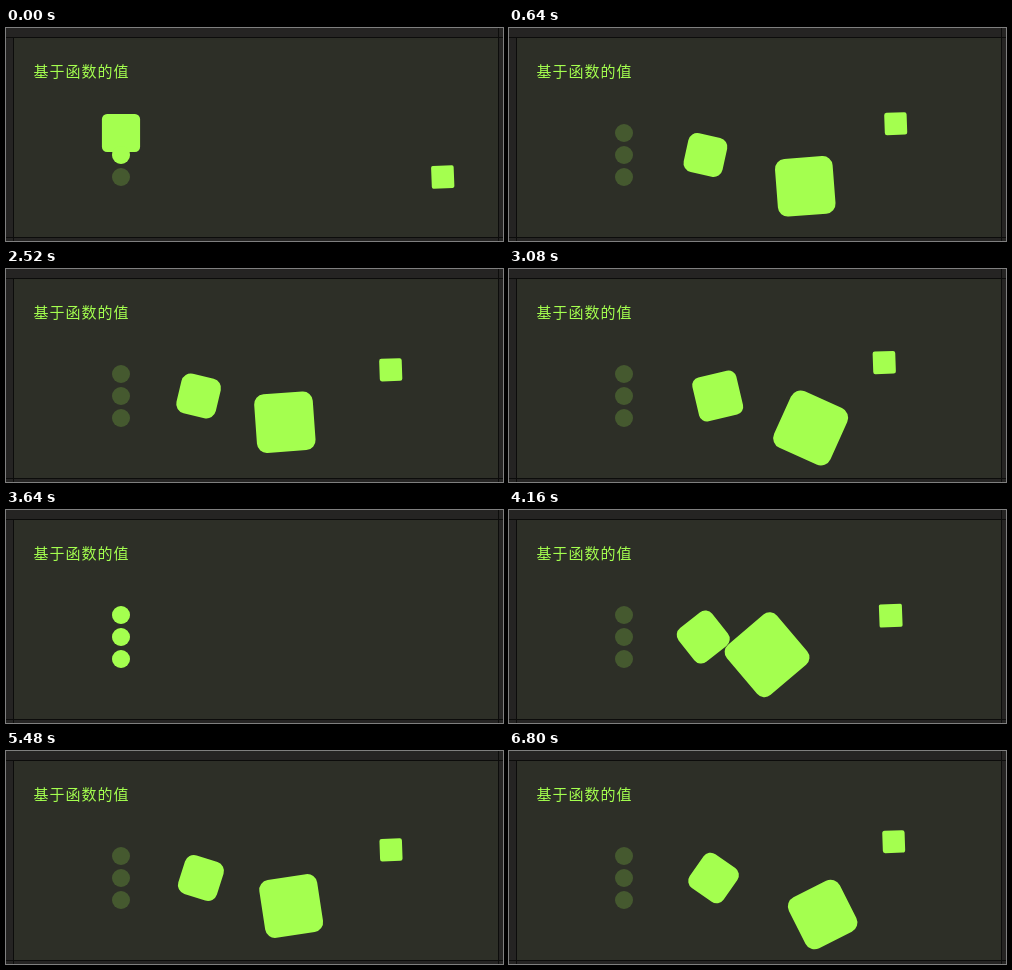
Write an HTML page that moves like this. It is 497x213 px and loops after 6880 ms.

```html
<!DOCTYPE html>
<html lang="zh-CN">
<head>
<meta charset="utf-8">
<title>基于函数的值</title>
<style>
  html, body { margin: 0; width: 100%; height: 100%; overflow: hidden; background: #252423; }
  svg { display: block; width: 497px; height: 213px; }
  .panel { fill: #2d2f27; }
  .line { fill: #0c0c0b; }
  .lime { fill: #a4ff4f; }
  .ghost { opacity: .2; }
  text { font: 400 15px "Noto Sans CJK SC", "Noto Sans CJK", sans-serif; letter-spacing: 1px; }
</style>
</head>
<body>
<svg viewBox="0 0 497 213">
  <rect class="panel" x="8" y="10" width="484" height="199"/>
  <g class="line">
    <rect x="0" y="9" width="497" height="1"/>
    <rect x="0" y="209" width="497" height="1"/>
    <rect x="7" y="9" width="1" height="204"/>
    <rect x="492" y="0" width="1" height="213"/>
  </g>
  <text class="lime" x="27.5" y="48.5">基于函数的值</text>
  <g class="lime ghost">
    <circle cx="115" cy="105" r="9"/>
    <circle cx="115" cy="127" r="9"/>
    <circle cx="115" cy="149" r="9"/>
  </g>
  <g id="shapes" class="lime"></g>
</svg>
<script>
  const LOOP = 6880, STEP = 40;
  const SWING = 1957, LEAD = 252;   // one-way run, and how far into it the loop begins
  const SIZE = 18;

  // Each property: [from, to, delay, duration]
  const items = [
    { y0: 105, x: [0, 170, 322, 1770], y: [0, 50, 338, 1720], scale: [1, 3.25, 177, 1300],
      rotate: [0, -279, 255, 1610], radius: [.5, .17, 35, 1450] },
    { y0: 127, x: [0, 80, 291, 1680], y: [0, 0, 300, 1500], scale: [1, 2.25, 290, 1400],
      rotate: [0, 288, 256, 1590], radius: [.5, .23, 254, 1690] },
    { y0: 149, x: [0, 270, 26, 1212], y: [0, -50, 312, 1800], scale: [1, 1.25, 60, 1500],
      rotate: [0, -2, 40, 1400], radius: [.5, .1, 60, 1400] }
  ];

  const group = document.getElementById('shapes');
  for (const item of items) {
    item.node = document.createElementNS('http://www.w3.org/2000/svg', 'rect');
    const attrs = { x: -SIZE / 2, y: -SIZE / 2, width: SIZE, height: SIZE };
    for (const key in attrs) item.node.setAttribute(key, attrs[key]);
    group.appendChild(item.node);
  }

  function elasticOut(t) {
    if (t <= 0) return 0;
    if (t >= 1) return 1;
    return 1 - 2 ** (-10 * t) * Math.cos(4 * Math.PI * t);
  }

  function tween([from, to, delay, duration], time) {
    return from + (to - from) * elasticOut((time - delay) / duration);
  }

  function draw(time) {
    const u = (time + LEAD) % (2 * SWING);
    const phase = u < SWING ? u : 2 * SWING - u;
    for (const { node, y0, x, y, scale, rotate, radius } of items) {
      const at = track => tween(track, phase);
      node.setAttribute('rx', SIZE * at(radius));
      node.setAttribute('transform',
        `translate(${115 + at(x)} ${y0 + at(y)}) scale(${at(scale)}) rotate(${at(rotate)})`);
    }
  }

  const start = performance.now();
  function tick() {
    const time = (performance.now() - start) % LOOP;
    draw(Math.floor(time / STEP) * STEP);
    requestAnimationFrame(tick);
  }
  tick();
</script>
</body>
</html>
```
